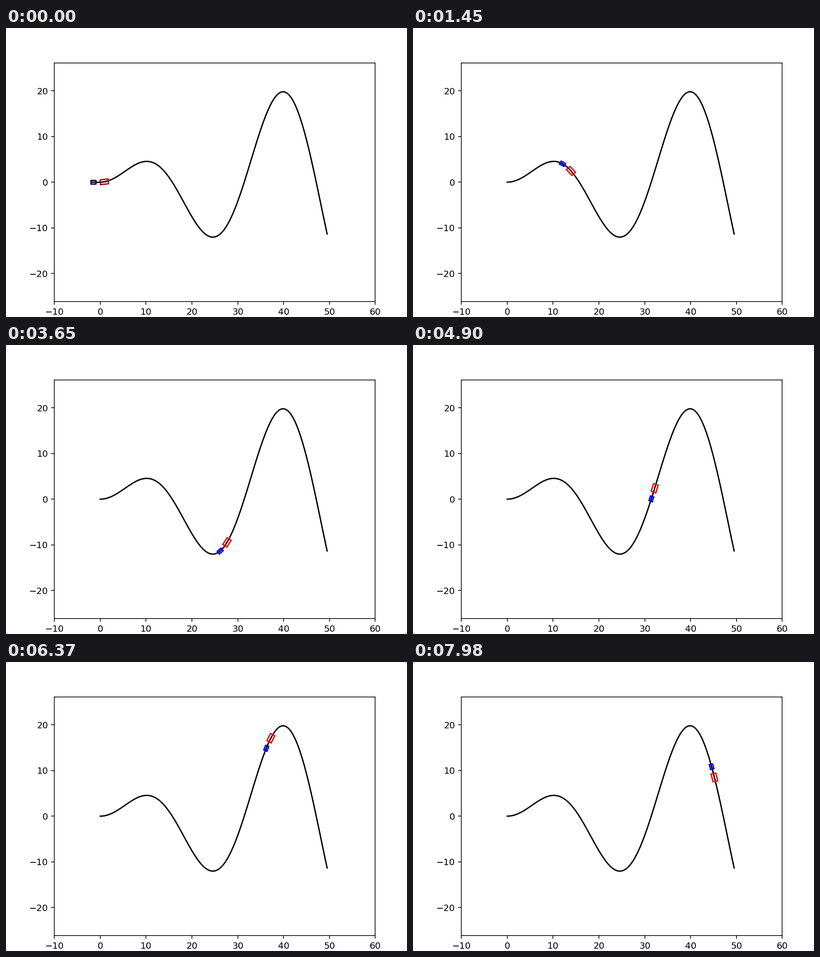
Animation of 880x636 px, one loop 8 s. Source, as a matplotlib script:

```python
import matplotlib.pyplot as plt
import numpy as np
from matplotlib.animation import FuncAnimation

W, H, DPI = 880, 636, 160
K = 141.9 / DPI              # point scale of the drawing
FRAMES, INTERVAL = 200, 40
STEP_MS = 68.2               # time of one simulation step
START, SPEED = 0.9, 0.706    # truck centre along the course, advance per step

TRUCK, TRAILER = (1.75, 1.05), (1.1, 0.75)
SPACING, HITCH, LAG = 2.42, 1.25, 0.4

plt.rcParams.update({
    "font.family": "DejaVu Sans", "font.size": 10 * K,
    "axes.linewidth": 0.8 * K, "lines.linewidth": 1.5 * K,
})
for axis in ("xtick", "ytick"):
    plt.rcParams.update({f"{axis}.major.size": 3.5 * K,
                         f"{axis}.major.width": 0.8 * K,
                         f"{axis}.major.pad": 3.5 * K})


def height(x):
    return np.where(x > 0, np.sin(x / 5) * x / 2, 0)


# Arc length from the course start, with a flat run-in before it
xs = np.linspace(-5, 52, 6000)
arc = np.cumsum(np.hypot(np.gradient(xs), np.gradient(height(xs))))
arc -= np.interp(0, xs, arc)


def point(s):
    x = np.interp(s, arc, xs)
    return np.array([x, float(height(x))])


def heading(s):
    d = point(s + 0.05) - point(s - 0.05)
    return d / np.hypot(*d)


def box(center, ahead, size):
    along = ahead * size[0] / 2
    across = np.array([-ahead[1], ahead[0]]) * size[1] / 2
    corners = [(-1, -1), (1, -1), (1, 1), (-1, 1), (-1, -1)]
    return np.array([center + a * along + b * across for a, b in corners]).T


def mix(dark, full, u):
    return tuple(np.array(dark) * (1 - u) + np.array(full) * u)


fig = plt.figure(figsize=(W / DPI, H / DPI), dpi=DPI, facecolor="white")
ax = fig.add_axes([106.3 / W, 34.25 / H, 704 / W, 525 / H])
ax.set_xlim(-10, 60)
ax.set_ylim(-26.1, 26.1)
ax.set_xticks(range(-10, 61, 10))
ax.set_yticks(range(-20, 21, 10))

cx = np.arange(0, 50, 0.5)
ax.plot(cx, height(cx), color="black")
bar, = ax.plot([], [], color="black")
trailer, = ax.plot([], [])
truck, = ax.plot([], [])


def update(i):
    n = int((i + 0.5) * INTERVAL / STEP_MS + 0.05)
    s = START + SPEED * n
    p, d = point(s), heading(s - LAG)
    q, e = point(s - SPACING), heading(s - SPACING)
    truck.set_data(*box(p, d, TRUCK))
    trailer.set_data(*box(q, e, TRAILER))
    bar.set_data(*np.array([q - 0.3 * e, p - HITCH * d, p - TRUCK[0] / 2 * d]).T)
    u = min(1, n / 4)        # colours brighten over the first steps
    truck.set_color(mix((0.68, 0.05, 0.05), (1, 0, 0), u))
    trailer.set_color(mix((0.05, 0.05, 0.28), (0, 0, 1), u))
    return bar, trailer, truck


anim = FuncAnimation(fig, update, frames=FRAMES, interval=INTERVAL,
                     init_func=lambda: update(0), repeat=True, repeat_delay=0)
plt.show()
```
